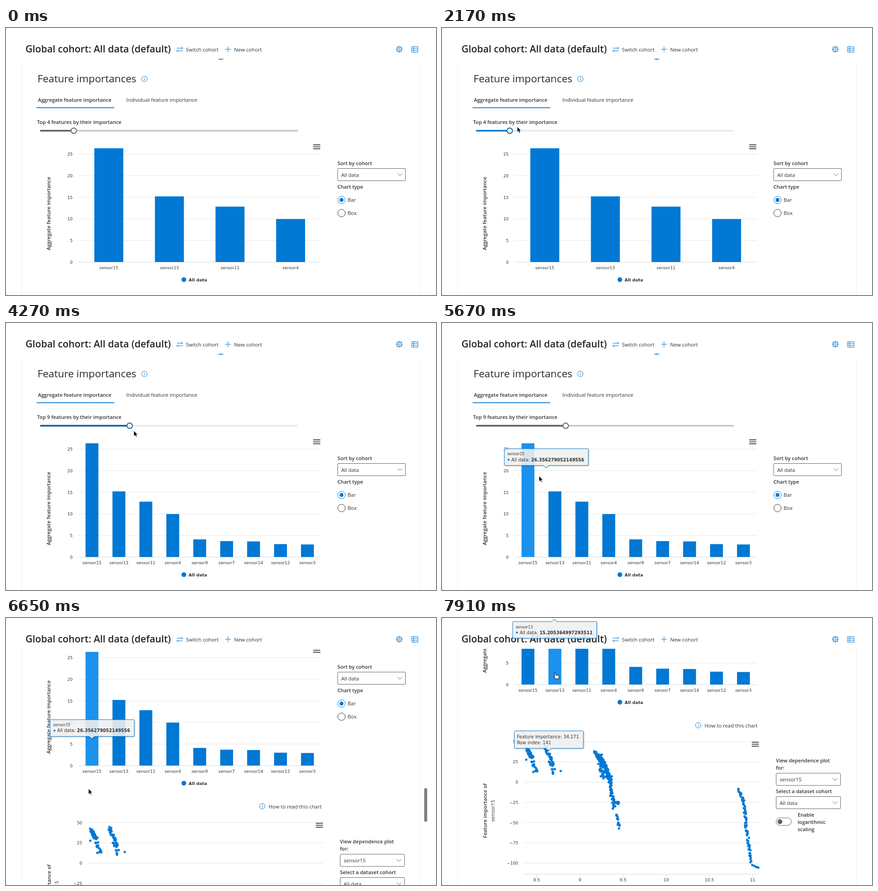
An HTML page for the animation above (8 s loop, 949 by 590 pixels).

```html
<!DOCTYPE html>
<html lang="en">
<head>
<meta charset="utf-8">
<title>Feature importances</title>
<style>
  html, body { margin: 0; width: 100%; height: 100%; overflow: hidden; background: #fff; }
  svg { display: block; width: 100vw; height: 100vh; }
  text { font: 11.35px "Open Sans", "Noto Sans", sans-serif; fill: #323130; white-space: pre; }
  .b { font-weight: 600; font-size: 11.2px; }
  .title { font-weight: 600; font-size: 21.3px; fill: #242424; }
  .head { font-weight: 500; font-size: 22.6px; fill: #292827; }
  .tick, .tip { font: 9.1px "DejaVu Sans", Verdana, sans-serif; fill: #333; }
  .legend { font: bold 9.4px "DejaVu Sans", Verdana, sans-serif; fill: #333; }
  .tip { font-size: 9.8px; }
  .tip.small { font-size: 8.3px; }
  .value { font-weight: bold; font-size: 9.6px; }
  .mid { text-anchor: middle; }
  .end { text-anchor: end; }
  .line { fill: none; stroke: #0078d4; }
  .box { fill: #fff; stroke: #605e5c; }
  .grid { stroke: #e6e6e6; }
  .axis { stroke: #d3d9e4; }
  .bubble { fill: #f7f7f7; fill-opacity: .86; stroke: #0078d4; stroke-linejoin: round; filter: drop-shadow(1px 1px 1px rgba(0,0,0,.25)); }
</style>
</head>
<body>
<svg id="stage" viewBox="0 0 949 590" xmlns="http://www.w3.org/2000/svg"></svg>
<script>
const LOOP = 8000, STEP = 70;
const BLUE = '#0078d4', LIGHT = '#1a92ee', DARK = '#005a9e', GREY = '#605e5c';
const SCROLL_END = 370;

const sensors = [15, 13, 11, 4, 9, 7, 14, 12, 3];
const values = [26.356, 15.205, 12.83, 9.95, 4.08, 3.68, 3.6, 2.98, 2.9];

// Scatter strands: count, spread, start x y, end x y
const strands = [
  [32, 3.2, 189, 289, 198, 308], [16, 5, 197, 311, 207, 342],
  [30, 3.4, 228, 284, 241, 314], [20, 5, 239, 313, 248, 341],
  [20, 3, 338, 295, 346, 314], [95, 5, 347, 304, 371, 355],
  [20, 4, 349, 325, 356, 352], [50, 3.5, 369, 352, 380, 420],
  [12, 3, 383, 407, 391, 409], [14, 2.5, 384, 434, 391, 463],
  [14, 2, 654, 379, 665, 403], [36, 2.3, 666, 405, 673, 480],
  [20, 2.4, 675, 488, 683, 540], [5, 1.5, 686, 547, 697, 552],
  [2, 0, 186, 313, 262, 338]
];

const text = (x, y, s, cls = '') => `<text x="${x}" y="${y}" class="${cls}">${s}</text>`;
const turned = (x, y, s, cls) =>
  `<text transform="translate(${x} ${y}) rotate(-90)" class="mid ${cls}">${s}</text>`;
const rect = (x, y, w, h, attrs) => `<rect x="${x}" y="${y}" width="${w}" height="${h}" ${attrs}/>`;
const circle = (x, y, r, attrs) => `<circle cx="${x}" cy="${y}" r="${r}" ${attrs}/>`;
const path = (d, attrs) => `<path d="${d}" ${attrs}/>`;
const hline = (x1, x2, y, cls) => path(`M${x1} ${y}H${x2}`, `class="${cls}"`);
const range = (n, f) => Array.from({ length: n }, (_, i) => f(i)).join('');

const menu = (x, y) =>
  path(`M${x} ${y}h14m-14 4.4h14m-14 4.4h14`, 'stroke="#595959" stroke-width="2.2" stroke-linecap="round"');
const info = (x, y) => circle(x, y, 6, 'class="line"') +
  path(`M${x} ${y - .8}v3.8M${x} ${y - 3.2}v1.2`, 'class="line"');
const dropdown = (x, y, w, s) => rect(x, y, w, 27, 'rx="1.5" class="box"') +
  text(x + 7.7, y + 18.4, s) +
  path(`M${x + w - 17} ${y + 11}l5 5 5-5`, `fill="none" stroke="${GREY}"`);
const radio = (y, s, on) =>
  circle(740.5, y, 8.2, `fill="#fff" stroke="${on ? BLUE : '#323130'}"`) +
  (on ? circle(740.5, y, 4.4, `fill="${BLUE}"`) : '') + text(754, y + 4.4, s);

// Tooltip outline with its tail at x, above or below
function bubble(w, h, x, up) {
  const top = up ? `H${x - 6}l6-5 6 5` : '', foot = up ? '' : `H${x + 6}l-6 5-6-5`;
  return path(`M1 0${top}H${w - 1}l1 1V${h - 1}l-1 1${foot}H1l-1-1V1z`, 'class="bubble"');
}

function random(seed) {
  return () => (seed = seed * 16807 % 2147483647) / 2147483647;
}

function scatterDots() {
  const rnd = random(77);
  return strands.map(([n, spread, x1, y1, x2, y2]) => range(n, i => {
    const u = i / (n - 1), jitter = () => (rnd() * 2 - 1) * spread;
    return circle(x1 + (x2 - x1) * u + jitter(), y1 + (y2 - y1) * u + jitter(), 2.6, '');
  })).join('');
}

function header() {
  const teeth = range(8, i => `<path d="M-1.3-4.8L-.9-6.6H.9L1.3-4.8" transform="rotate(${i * 45})"/>`);
  return text(43, 54, 'Global cohort: All data (default)', 'title') +
    path('M377 44.5h13m-3-3 3 3-3 3M390 50.5h-13m3-3-3 3 3 3', 'class="line"') +
    text(397, 51.7, 'Switch cohort') +
    path('M483.5 47h13M490 40.5v13', 'class="line"') +
    text(503.5, 51.7, 'New cohort') +
    `<g transform="translate(868 47)" class="line">${teeth}${circle(0, 0, 4.9, '')}${circle(0, 0, 2.1, '')}</g>` +
    path('M895.5 41h13.5v12.5h-13.5zm0 4h13.5m-13.5 4.2h13.5M900 41v12.5', 'class="line"');
}

function importancePanel() {
  return circle(474, 57, 13, `fill="${BLUE}"`) +
    path('M34.5 83V1200M914.5 83V1200', 'stroke="#ededed"') +
    text(69.5, 119.7, 'Feature importances', 'head') + info(305.5, 112.5) +
    text(70.5, 163, 'Aggregate feature importance', 'b') +
    text(265.5, 163, 'Individual feature importance') +
    rect(67.5, 175.3, 171.5, 1.8, `fill="${BLUE}"`) +
    '<text id="top" x="68.5" y="212" class="b"></text><g id="slider"></g>' +
    range(6, i => {
      const y = 517.3 - i * 47.75;
      return hline(160, 695, y, i ? 'grid' : 'axis') + text(147, y + 3.6, i * 5, 'tick end');
    }) +
    turned(98, 410, 'Aggregate feature importance', 'b') + menu(678.8, 258.1) +
    '<g id="bars"></g>' +
    circle(392.5, 556, 5.2, `fill="${BLUE}"`) + text(403, 560, 'All data', 'legend') +
    text(731.5, 303, 'Sort by cohort', 'b') + dropdown(732, 310.5, 149.5, 'All data') +
    text(731.5, 355, 'Chart type', 'b') + radio(380, 'Bar', true) + radio(409, 'Box', false);
}

function dependencePanel() {
  return info(565.5, 237) + text(579.5, 242, 'How to read this chart') +
    range(7, i => {
      const v = 50 - 25 * i, y = 273 + i * 44.75;
      return hline(181, 701, y, 'grid') + text(168, y + 3.5, v < 0 ? '−' + -v : v, 'tick end');
    }) +
    hline(181, 701, 566, 'axis') +
    range(6, i => {
      const x = 209 + i * 95.3;
      return path(`M${x} 566v8`, 'class="axis"') + text(x, 582, 8.5 + i / 2, 'tick mid');
    }) +
    turned(99, 426, 'Feature importance of', 'b') + turned(116, 426, 'sensor15', '') +
    `<g clip-path="url(#reveal)" fill="${BLUE}">${scatterDots()}</g>` + menu(684.6, 274.6) +
    text(737, 319, 'View dependence plot', 'b') + text(737, 335, 'for:', 'b') +
    dropdown(737.5, 343, 142, 'sensor15') +
    text(737, 387, 'Select a dataset cohort', 'b') + dropdown(737.5, 394.5, 142, 'All data') +
    rect(737.5, 441.7, 33.5, 16.6, 'rx="8.3" class="box"') + circle(745.8, 450, 5.2, `fill="${GREY}"`) +
    ['Enable', 'logarithmic', 'scaling'].map((s, i) => text(785, 438.6 + i * 16, s, 'b')).join('');
}

const stage = document.getElementById('stage');
stage.innerHTML = `
  <defs>
    <clipPath id="view"><rect y="68" width="949" height="522"/></clipPath>
    <clipPath id="reveal"><rect id="revealRect" x="178" y="260" width="0" height="310"/></clipPath>
  </defs>
  <rect width="949" height="590" fill="#fff"/>
  <g clip-path="url(#view)"><g id="page">${importancePanel()}
    <g transform="translate(0 ${SCROLL_END})">${dependencePanel()}</g></g></g>
  ${header()}
  <path d="M0 0h1v1h-1zM0 589h1v1h-1z" fill="#777"/>
  <rect id="scrollbar" x="923" width="6.5" height="74" rx="3.2" fill="#7d7d7d"/>
  <g id="rowTip" transform="translate(159.5 249.5)">${bubble(152.5, 38.5, 75.5, false)}
    ${text(6, 16.5, 'Feature importance: 34.171', 'tip')}${text(6, 29.5, 'Row index: 141', 'tip')}</g>
  <g id="barTip"></g>
  <path id="arrow" d="M0 0V12.4L2.9 9.8 4.9 14.2 7 13.3 5.1 9H8.8z" fill="#000" stroke="#fff" stroke-width=".9"/>
  <path id="hand" d="M-1.5 0H1L2.2 4.5 6.6 5 8.8 6.3 9.3 9.4 8.6 13H2.8L-2.5 8.5-1.5 7 .2 7.8z" fill="#fff" stroke="#000" stroke-linejoin="round"/>`;
const el = Object.fromEntries([...stage.querySelectorAll('[id]')].map(e => [e.id, e]));

// Linear keyframes: time, then values
function track(keys, t) {
  const i = keys.findIndex(k => k[0] > t);
  if (i === 0) return keys[0].slice(1);
  if (i < 0) return keys[keys.length - 1].slice(1);
  const a = keys[i - 1], b = keys[i], f = (t - a[0]) / (b[0] - a[0]);
  return a.slice(1).map((v, k) => v + (b[k + 1] - v) * f);
}

const pointer = [
  [280, 472, 556], [420, 388, 271], [490, 388, 271], [1260, 291, 228], [1540, 291, 228],
  [1960, 167, 220], [2170, 166, 218], [2450, 222, 230], [3290, 222, 230], [4060, 282, 238],
  [5320, 282, 238], [5460, 266, 272], [5670, 214, 338], [6090, 182, 377], [7140, 182, 377],
  [7490, 234, 292], [7630, 247, 140], [7910, 249, 121.5]
];
const scrolling = [[6370, 0], [6440, 25], [6650, 191], [6790, 300], [6930, SCROLL_END]];

const countAt = t => 4 + [2590, 2870, 3080, 3640, 3920].filter(s => t >= s).length;

function sliderMarkup(n, t) {
  const pressed = t >= 3360 && t < 4830, hover = t >= 1610 && t < 4830;
  const x = 75.5 + (n - 1) * 24.68;
  const bar = (end, c) => rect(75, 225.3, end - 75, 3.4, `rx="1.7" fill="${c}"`);
  return bar(644.5, hover ? '#e1eaf3' : '#c8c6c4') +
    bar(x, pressed ? DARK : hover ? BLUE : GREY) +
    circle(x, 227, 6, `fill="#fff" stroke-width="1.8" stroke="${hover ? DARK : GREY}"`);
}

function barsMarkup(n, active) {
  const step = 535 / n, w = step * .478;
  return range(n, i => {
    const x = 160 + step * (i + .5), h = values[i] * 9.53;
    return rect(x - w / 2, 517 - h, w, h, `fill="${i === active ? LIGHT : BLUE}"`) +
      text(x, 533, 'sensor' + sensors[i], 'tick mid');
  });
}

// The tooltip closes a third of the gap in x and half in y on each tick
function chase(from, to, since, t) {
  const k = 1 + Math.floor((t - since) / 32);
  return [to[0] + (from[0] - to[0]) * (2 / 3) ** k, to[1] + (from[1] - to[1]) * .5 ** k];
}

function barTipMarkup(active, t) {
  const first = [157.5, 331], second = [97.5, 224.7], third = [157.5, 7.5];
  const up = t >= 7630;
  const [x, y] = up ? chase(second, third, 7630, t) : active === 0 ? chase(first, second, 5670, t) : first;
  const value = active === 0 ? '26.356279052149556' : '15.205364997293511';
  return `<g transform="translate(${x} ${y})">` + bubble(185.5, 37, 92, up) +
    text(6.5, 14.6, 'sensor' + sensors[active], 'tip small') + circle(9.5, 24.3, 2.1, `fill="${BLUE}"`) +
    text(15.5, 27.7, `All data: <tspan class="value">${value}</tspan>`, 'tip') + '</g>';
}

const clamp = v => Math.min(Math.max(v, 0), 1);
const show = (e, on) => e.setAttribute('visibility', on ? 'visible' : 'hidden');

function draw(time) {
  const t = Math.min(Math.floor(time / STEP) * STEP, 7910);
  const n = countAt(t);
  const active = t < 5460 ? -1 : t < 5670 ? 1 : t < 7630 ? 0 : 1;
  const [scroll] = track(scrolling, t);

  el.page.setAttribute('transform', `translate(0 ${-scroll})`);
  el.top.textContent = `Top ${n} features by their importance`;
  el.slider.innerHTML = sliderMarkup(n, t);
  el.bars.innerHTML = barsMarkup(n, active);
  el.barTip.innerHTML = active < 0 ? '' : barTipMarkup(active, t);
  show(el.rowTip, t >= 7420);

  const clock = t > 6930 && t < 7210 ? 6930 : t;
  const p = clamp((clock - 6355) / 1000);
  el.revealRect.setAttribute('width', 526 * (1 - Math.cos(Math.PI * p)) / 2);

  el.scrollbar.setAttribute('y', 349 + scroll * .142);
  el.scrollbar.setAttribute('opacity', t < 6440 ? 0 : clamp((7420 - t) / 280));

  const [x, y] = track(pointer, t), onBar = t >= 7630;
  for (const c of [el.arrow, el.hand]) c.setAttribute('transform', `translate(${x} ${y})`);
  show(el.arrow, t >= 280 && !onBar);
  show(el.hand, onBar);
}

const start = performance.now();
function frame() {
  draw((performance.now() - start) % LOOP);
  requestAnimationFrame(frame);
}
frame();
</script>
</body>
</html>
```
